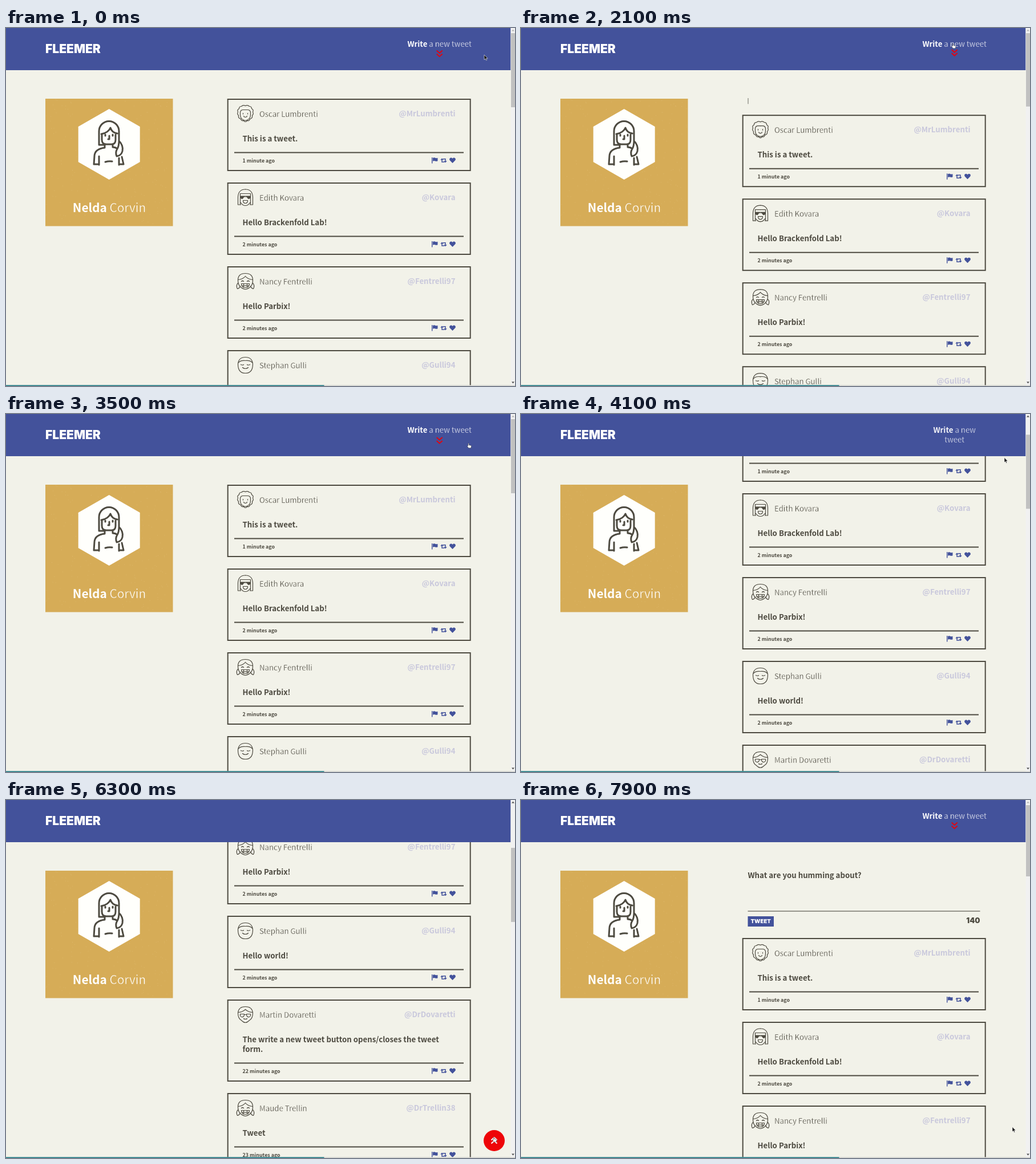
Recreate the animation shown at these times as an HTML page. Size 892 by 628 pixels, loop 8 s.

```html
<!DOCTYPE html>
<html lang="en">
<meta charset="utf-8">
<title>Fleemer</title>
<style>
  html, body { margin: 0; height: 100%; overflow: hidden; background: #f2f2e9 }
  svg { display: block; font: 300 13.25px "Noto Sans CJK JP", "Noto Sans CJK SC", "Noto Sans CJK", "Open Sans", sans-serif }
  text { fill: #4d4a40; white-space: pre }
  .bold { font-weight: 600; stroke: none }
  .thin { stroke: var(--back, #f2f2e9); stroke-width: .022em }
  .mid { text-anchor: middle }
  .handle { font-weight: 600; text-anchor: end; fill: #c9c8dc }
  .time { font-size: 8.9px; font-weight: 600 }
  .white { fill: #fff }
  .slab { font-family: Inter, sans-serif; font-weight: 900 }
  .line { fill: none; stroke: #4d4a40; stroke-linecap: round; stroke-linejoin: round }
  #profile { --back: #d6ac57 }
  #link { --back: #43529b }
</style>
<svg width="892" height="628" viewBox="0 0 892 628">
  <defs>
    <path id="chevrons" d="M-5-5.5l5 4.5 5-4.5M-5 .5l5 4.5 5-4.5" fill="none" stroke-width="2" />
    <clipPath id="formClip"><rect id="formWindow" x="380" y="121" width="440" height="0" /></clipPath>
  </defs>
  <rect width="892" height="628" fill="#f2f2e9" />

  <g id="profile">
    <rect x="69" y="124" width="223.5" height="223.5" fill="#d6ac57" />
    <path id="specks" stroke="#e6c684" stroke-width=".8" opacity=".6" />
    <path d="M180.700 142l54 31v62l-54 31-54-31v-62z" fill="#fffffc" />
    <path class="line" stroke-width="3" d="M163 205V181a17 17 0 0 1 35 0v17q8 8 6 18-2 8-10 9-3-7 1-13 3-5 3-14M163 205h10
      M168 186v10q0 8 8 8h9q7 0 7-8v-9M167 186q12-2 16-11 3 9 12 10M174 187v2M187 187v2M181 189v6h-2
      M173 205v5q-17 2-18 14l-1 15h8M163 240v-15M187 205v4q5 0 8 3M203 226l3 13h-8M198 240v-12M174 235q6-2 12-1" />
    <text class="mid white thin" x="181" y="323" font-size="20.8"><tspan class="bold">Nelda</tspan> Corvin</text>
  </g>

  <g clip-path="url(#formClip)"><g id="form">
    <text class="bold" x="397.5" y="137">What are you humming about?</text>
    <path id="caret" d="M398 146v12" stroke="#4d4a40" stroke-width=".8" />
    <path d="M397.5 195h407" stroke="#77756c" stroke-width="1.6" />
    <rect x="397.5" y="204" width="45.5" height="18" fill="#43529b" />
    <text class="slab mid white" x="420.2" y="216.3" font-size="9.6">TWEET</text>
    <text class="slab" x="804.5" y="216" font-size="13" text-anchor="end">140</text>
  </g></g>
  <g id="list"></g>

  <rect width="884.5" height="74" fill="#43529b" />
  <text class="slab white" x="69" y="44" font-size="21">FLEEMER</text>
  <g id="link"></g>

  <g id="toTop">
    <circle cx="855.5" cy="597.5" r="18.5" fill="#ee0508" />
    <use href="#chevrons" stroke="#fff" transform="translate(855.5 597) scale(1 -1)" />
  </g>

  <rect y="626.4" width="892" height="1.6" fill="#d4d5d0" />
  <rect y="626.4" width="557.5" height="1.6" fill="#28808a" />
  <rect x="884.5" width="7.5" height="626.4" fill="#f1f1f1" />
  <rect id="thumb" x="885" width="7" fill="#c1c1c1" />
  <path id="arrowUp" d="M886 5.5l2.5-3 2.5 3z" />
  <path d="M886 620.5l2.5 3 2.5-3z" fill="#505050" />

  <path id="arrow" d="M0 0v8.6l2-1.8 1.3 3 1.4-.6-1.3-2.9h2.7z" fill="#111" stroke="#fff" stroke-width=".6" />
  <path id="hand" d="M-.7 4V.8q.7-1 1.4 0V3.6l3.6.7q.7.3.6 1.2l-.7 3.3h-4l-2.4-3q-.2-1 .8-.8z" fill="#fff" stroke="#222" stroke-width=".5" />
</svg>
<script>
const $ = id => document.getElementById(id);

// Avatars: right half of each line drawing, plus an optional filled half; both are mirrored.
const avatars = {
  curly: ['M0-14q4-2 7 1 4 0 4 4 4 2 2 6 2 3-1 6 1 5-4 6-1 4-5 3-1 2-3 2M0-7h4q4 0 5 4v5q0 8-9 10M4-1v1.5M0 6q2 0 3-2'],
  shades: ['M0-14.5q12 0 13 13v14H8M9 12V-7H0M8 9q-3 5-8 5M0 5h4q0 5-4 5', 'M0-3h9v3q-3 5-6 0l-1-1H0z'],
  pigtails: ['M0-14q13 0 13 12 0 13-13 16M0-9q4 5 12 6M13 3q4 4 1 10-4-1-5-5M3 0q2-2 4 0M0 4h7q0 7-7 7M0 7.5h6M3 4v6'],
  bald: ['M0-14q12 0 13 12 0 16-13 16M0-8q9-1 12.5 4M3-1q2 1.5 5 0M0 6q3 0 5-2'],
  glasses: ['M0-14q12 0 13 11 0 10-6 13-4 4-7 4M0-9q6 5 12 5M2-1h7v3q-3 4-6 1-1-1-1-4zM0 0h2M0 8q2 0 3-1']
};

const tweets = [
  ['curly', 'Oscar Lumbrenti', '@MrLumbrenti', '1 minute', 'This is a tweet.'],
  ['shades', 'Edith Kovara', '@Kovara', '2 minutes', 'Hello Brackenfold Lab!'],
  ['pigtails', 'Nancy Fentrelli', '@Fentrelli97', '2 minutes', 'Hello Parbix!'],
  ['bald', 'Stephan Gulli', '@Gulli94', '2 minutes', 'Hello world!'],
  ['glasses', 'Martin Dovaretti', '@DrDovaretti', '22 minutes', 'The write a new tweet button opens/closes the tweet', 'form.'],
  ['pigtails', 'Maude Trellin', '@DrTrellin38', '23 minutes', 'Tweet']
];

function avatar(kind) {
  const [stroke, fill = ''] = avatars[kind];
  const half = `<path class="line" stroke-width="1.2" d="${stroke}"/><path fill="#4d4a40" d="${fill}"/>`;
  return `<g transform="translate(419.5 26.5)">${half}<g transform="scale(-1 1)">${half}</g></g>`;
}

function card([kind, name, handle, age, ...lines], y) {
  const extra = 17 * (lines.length - 1);
  return `<g transform="translate(0 ${y})">
    <rect x="388.7" y="1" width="425" height="${125 + extra}" fill="none" stroke="#4d4a40" stroke-width="2"/>
    ${avatar(kind)}
    <text class="thin" x="444" y="31.5">${name}</text>
    <text class="handle" x="787.5" y="31.3">${handle}</text>
    ${lines.map((line, i) => `<text class="bold" x="414.5" y="${75 + 17 * i}">${line}</text>`).join('')}
    <g transform="translate(0 ${extra})">
      <path d="M400 94.5h402" stroke="#4d4a40" stroke-width="2"/>
      <text class="time" x="414.5" y="112.2">${age} ago</text>
      <g transform="translate(746 103)" fill="#43529b">
        <path d="M0 0h1.4v10.5H0zM2 1q2.5-1.4 4.5 0 2 .8 4-.2v5.4q-2 1.2-4.2.2-2-1-4.3.4z
          M15.2 4.4l2.8-3 2.8 3zM21.2 6.3h5.6l-2.8 3z
          M36.5 10l-4.4-4.4q-2-2.6 0-4.4 2.4-1.6 4.4.8 2-2.4 4.4-.8 2 1.8 0 4.4z"/>
        <path d="M18 4v4h4.5M24 7V2.8h-4.5" fill="none" stroke="#43529b" stroke-width="1.5"/>
      </g>
    </g></g>`;
}

let nextTop = 124;
$('list').innerHTML = tweets.map(tweet => {
  const html = card(tweet, nextTop);
  nextTop += tweet.length > 5 ? 164 : 147;
  return html;
}).join('');

let seed = 7;
const random = () => (seed = seed * 16807 % 2147483647) / 2147483647;
$('specks').setAttribute('d', Array.from({ length: 260 }, () =>
  `M${(70 + random() * 221).toFixed(1)} ${(125 + random() * 221).toFixed(1)}h.9`).join(''));

// Rows of [time, value, ...], joined by straight lines.
const scrollKeys = [[3850, 0], [4100, 132], [4400, 275], [4700, 362]];
const cursorKeys = [
  [0, 838, 47], [400, 812, 32], [700, 768, 20], [900, 752, 42], [1100, 800, 58], [1250, 826, 35],
  [1400, 790, 2], [1600, 727, 18], [1800, 750, 32], [1900, 757, 27], [3100, 757, 27], [3600, 824, 57],
  [3700, 842, 66], [3850, 842, 66], [4100, 847, 76.5], [4700, 844, 149], [4800, 849, 202], [4900, 849, 202],
  [5100, 833, 408], [5300, 833, 408], [5600, 852, 523], [5700, 852, 523], [5900, 841, 562], [6000, 851, 579],
  [6100, 851, 579], [6300, 855, 591], [7100, 855, 591], [7900, 861, 573.5]
];

function track(keys, t) {
  const next = keys.findIndex(key => key[0] > t);
  if (next < 1) return keys.at(next).slice(1);
  const from = keys[next - 1], to = keys[next], p = (t - from[0]) / (to[0] - from[0]);
  return from.slice(1).map((value, i) => value + (to[i + 1] - value) * p);
}

const swing = (t, start) => .5 - Math.cos(Math.PI * Math.min(1, Math.max(0, (t - start) / 400))) / 2;
const move = (id, x, y) => $(id).setAttribute('transform', `translate(${x} ${y})`);

function drawLink(hidden, bob) {
  const write = '<tspan class="bold">Write</tspan>';
  const lines = hidden < .04 ? [write + ' a new tweet'] : hidden < .45 ? [write + ' a new', 'tweet'] : [write, 'a new', 'tweet'];
  $('link').innerHTML = lines.map((line, i) => `<text class="mid white thin" x="759.7" y="${33 + 17 * i}">${line}</text>`).join('')
    + (lines.length > 1 ? '' : `<use href="#chevrons" x="759.7" y="${45 + bob}" stroke="#e00612"/>`);
  $('link').style.opacity = 1 - hidden;
}

function draw(t) {
  const open = 118 * (swing(t, 1970) - swing(t, 2914) + swing(t, 7200));
  const scroll = track(scrollKeys, t)[0] * (1 - swing(t, 6592));
  const linkHidden = swing(t, 4030) - swing(t, 7200);
  const [x, y] = track(cursorKeys, t);

  move('list', 0, open - scroll);
  $('formWindow').setAttribute('height', Math.max(0, open - 16));
  const opening = t < 2900 || t > 7000;
  move('form', 0, opening ? -Math.min(23, 118 - open) : 0);
  $('caret').style.opacity = t > 7000 ? +(t < 7700) : +(t < 2500 || t >= 3000);

  const overLink = linkHidden < .5 && x > 705 && x < 815 && y > 19 && y < 52;
  const overButton = t > 6000 && t < 7500 && Math.hypot(x - 855.5, y - 597.5) < 18.5;
  drawLink(linkHidden, overLink ? 1.5 * Math.cos(t / 160 * Math.PI) : 0);
  $('toTop').style.opacity = swing(t, 4150) - swing(t, 7100);

  const page = 2947 + open;
  $('thumb').setAttribute('y', 9 + 610 * scroll / page);
  $('thumb').setAttribute('height', 610 * 628 / page);
  $('arrowUp').setAttribute('fill', scroll > 0 ? '#505050' : '#b5b5b5');

  const pointing = overLink || overButton;
  $('hand').style.display = pointing ? '' : 'none';
  $('arrow').style.display = pointing ? 'none' : '';
  move(pointing ? 'hand' : 'arrow', x, y);
}

function tick() {
  draw(Math.floor(performance.now() % 8000 / 100) * 100);
  requestAnimationFrame(tick);
}
tick();
</script>
</html>
```
